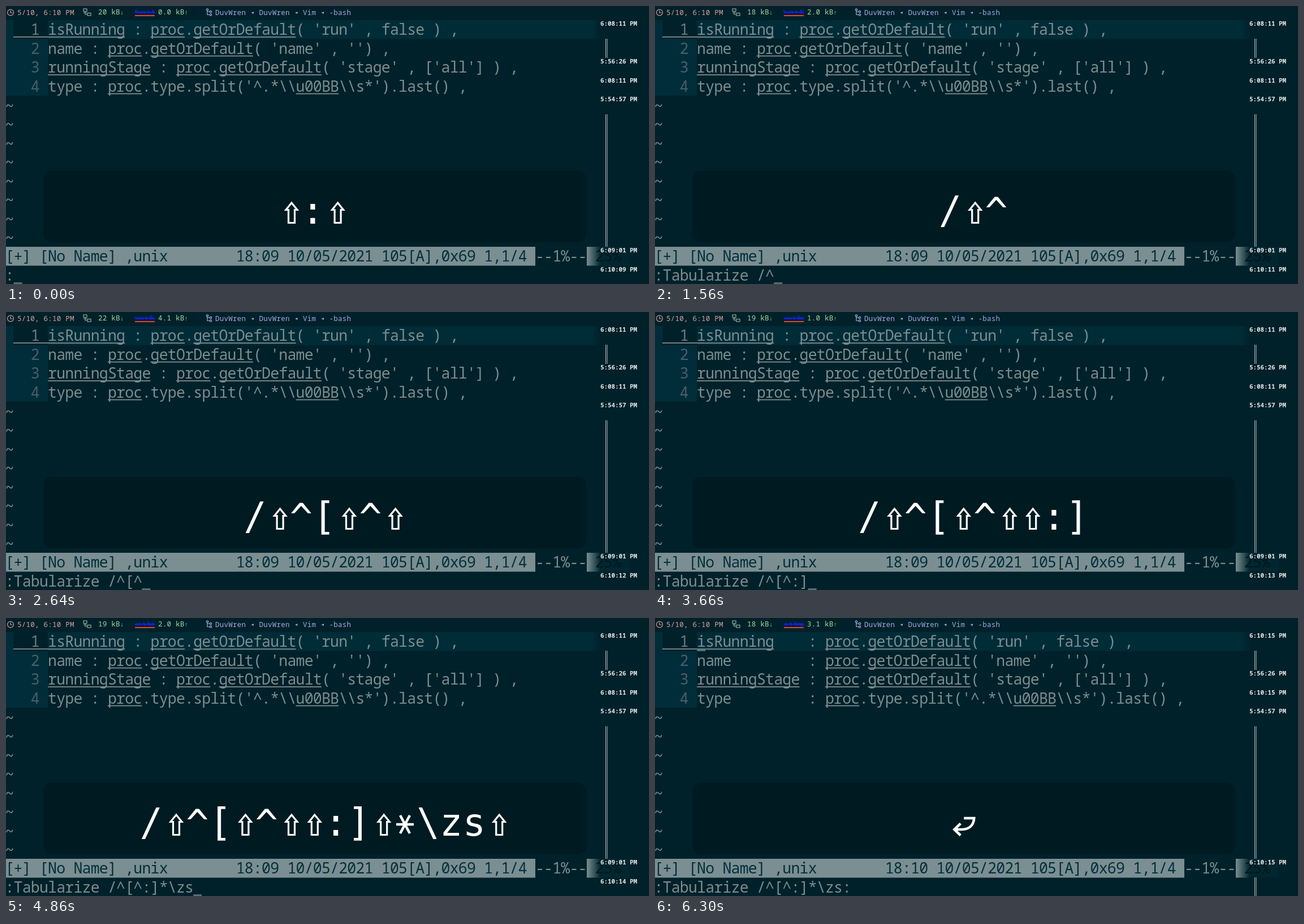
An HTML page that plays this animation: 1137x493 px, repeating every 6360 ms.

```html
<!DOCTYPE html>
<html lang="en">
<head>
<meta charset="utf-8">
<title>Aligning code on a colon</title>
<style>
  html, body { margin: 0; width: 100%; height: 100%; overflow: hidden; background: #00212a; }
  svg { display: block; width: 100vw; height: 100vh; }
  text { white-space: pre; font-family: "Noto Sans Mono", "DejaVu Sans Mono", monospace; }
  .code { font-size: 26.5px; font-weight: 300; letter-spacing: calc(15.12px - .6em); fill: #7b8d8f; }
  .code.num { fill: #48606a; }
  .code.num.on { fill: #687d82; }
  .code.dark { fill: #00303c; }
  .bar { font-size: 12.5px; letter-spacing: calc(7.75px - .6em); }
  .small { font-size: 10.5px; }
  .stamp { font-size: 11px; font-weight: 700; letter-spacing: calc(6.5px - .6em); fill: #e4e8e8; }
  .rule { fill: #7b8d8f; }
  .key { font: 67px "DejaVu Sans Mono", monospace; fill: #fff; text-anchor: middle; }
  .shape { fill: none; stroke: #fff; }
  .icon { fill: none; stroke-width: 1.2; }
</style>
</head>
<body>
<svg viewBox="0 0 1137 493" preserveAspectRatio="none">
  <defs>
    <linearGradient id="row">
      <stop offset=".985" stop-color="#002c38"/>
      <stop offset="1" stop-color="#00212a"/>
    </linearGradient>
    <linearGradient id="fade">
      <stop offset="0" stop-color="#7b8e91"/>
      <stop offset=".32" stop-color="#00272f"/>
      <stop offset="1" stop-color="#00262f"/>
    </linearGradient>
  </defs>
  <rect width="1137" height="493" fill="#00212a"/>

  <!-- menu bar -->
  <g class="icon" stroke="#dc9f9b"><circle cx="8" cy="11.5" r="5.4"/><path d="M8 8v4h3.4"/></g>
  <text class="bar" x="20" y="16" fill="#dc9f9b">5/10, 6:10 PM</text>
  <g class="icon" stroke="#93ab9b"><rect x="137" y="5" width="6" height="4.5"/><rect x="144" y="12.5" width="6" height="4.5"/><path d="M140 10v5h4M137 12h6"/></g>
  <text class="bar" id="down" x="163" y="15" fill="#a5d99f"></text>
  <path id="graph" fill="none" stroke="#1420f0" stroke-width="1.2"/>
  <rect x="228" y="16" width="35" height="2" fill="#e8442e"/>
  <text class="bar" id="up" x="269" y="15" fill="#a5d99f"></text>
  <g class="icon" stroke="#a5a8e2"><circle cx="356" cy="6.5" r="1.7"/><circle cx="362" cy="10" r="1.7"/><circle cx="362" cy="15.5" r="1.7"/><path d="M356 8v7.5h4M356 10h4"/></g>
  <text class="bar" x="370" y="16" fill="#a5a8e2">DuvWren ◂ DuvWren ◂ Vim ◂ -bash</text>

  <!-- editor -->
  <rect y="25" width="1052" height="33.5" fill="url(#row)"/>
  <rect y="25" width="74" height="134" fill="#002d39"/>
  <rect x="13.5" y="25" width="60.5" height="33.5" fill="#00212a"/>
  <g id="gutter"></g>
  <rect class="rule" x="13" y="54" width="61" height="1.8"/>
  <g id="before"></g>
  <g id="after"></g>

  <!-- key display -->
  <rect x="66" y="292" width="960" height="127" rx="15" fill="#001a21"/>
  <g id="keys"></g>

  <!-- status and command lines -->
  <rect y="427" width="936" height="33.5" fill="#7b8e91"/>
  <rect x="1027" y="427" width="75" height="33.5" fill="url(#fade)"/>
  <text class="code dark" id="status" x="-1.5" y="453"></text>
  <text class="code" x="936" y="453">--1%--</text>
  <text class="code" x="1041.8" y="453" style="fill:#00161d">25%</text>
  <text class="code" id="command" x="-1.5" y="487"></text>
  <rect class="rule" id="cursor" width="15" height="2"/>

  <!-- time line -->
  <path d="M1060.5 58V92M1063 58V92M1060.5 192V427M1063 192V427" stroke="#b4bebf"/>
  <path id="tail" d="M1060.5 460V493M1063 460V493" stroke="#b4bebf"/>
  <g id="stamps"></g>
</svg>
<script>
const LOOP = 6360, RUN = 5340, COL = 15.12, ROW = 33.5;
const $ = id => document.getElementById(id);
const colX = c => -1.5 + COL * c;
const rowY = r => 25 + ROW * r;

function add(parent, tag, attrs, text = '') {
  const el = document.createElementNS('http://www.w3.org/2000/svg', tag);
  for (const name in attrs) el.setAttribute(name, attrs[name]);
  el.textContent = text;
  parent.appendChild(el);
  return el;
}

const source = [
  ['isRunning', "proc.getOrDefault( 'run' , false ) ,"],
  ['name', "proc.getOrDefault( 'name' , '') ,"],
  ['runningStage', "proc.getOrDefault( 'stage' , ['all'] ) ,"],
  ['type', "proc.type.split('^.*\\\\u00BB\\\\s*').last() ,"]
];
const unknown = /isRunning|runningStage|proc|getOrDefault|u00BB/g;

function drawCode(group, pad) {
  source.forEach(([name, value], r) => {
    const line = `${name.padEnd(pad)} : ${value}`;
    add(group, 'text', { class: 'code', x: colX(5), y: rowY(r) + 26 }, line);
    for (const m of line.matchAll(unknown)) {
      add(group, 'rect', {
        class: 'rule', x: colX(5 + m.index), y: rowY(r) + 29.2,
        width: COL * m[0].length, height: 1.8
      });
    }
  });
}

drawCode($('before'), 0);
drawCode($('after'), 12);
for (let r = 0; r < 4; r++) {
  add($('gutter'), 'text', { class: 'code num' + (r ? '' : ' on'), x: colX(3), y: rowY(r) + 26 }, r + 1);
}
for (let r = 4; r < 12; r++) {
  add($('gutter'), 'text', { class: 'code', x: colX(0), y: rowY(r) + 27.5 }, '~');
}
const stamps = [0, 2, 3, 4, 12, 13].map(r =>
  add($('stamps'), 'text', { class: 'stamp', x: 1051, y: rowY(r) + 10 }));

// [time, key shown]; every key but shift and return is also typed
const strokes = [
  [120, 'T'], [240, 'a'], [360, 'b'], [480, 'u'], [600, 'l'], [720, 'a'],
  [840, 'r'], [900, 'i'], [960, 'z'], [1020, 'e'], [1140, ' '], [1260, '/'],
  [1380, '⇧'], [1500, '^'], [1860, '['], [2100, '⇧'], [2280, '^'], [2520, '⇧'],
  [2760, '⇧'], [2940, ':'], [3240, ']'], [3780, '⇧'], [4020, '*'], [4320, '\\'],
  [4500, 'z'], [4680, 's'], [4860, '⇧'], [5040, ':'], [RUN, '⏎']
];
const ticks = [360, 1300, 2240, 3240, 4200, 5160];
const traffic = [[20, '0.0'], [18, '2.0'], [22, '4.1'], [19, '1.0'], [19, '2.0'], [24, '1.0'], [18, '3.1']];

function typed(t) {
  let shown = '⇧:⇧', command = ':';
  for (const [at, key] of strokes) {
    if (at > t) break;
    shown = key === ' ' || key === '⏎' ? key : shown + key;
    if (!'⇧⏎'.includes(key)) command += key;
  }
  return { shown, command };
}

// keys drawn as strokes: offset, line width, path
const shapes = {
  '⇧': [3.5, 3.2, 'M0 349L10 361.5H5.5V384.500H-5.500V361.5H-10Z'],
  '⏎': [4, 4.5, 'M0 355H18C17 368 9 375 -4 375H-17M-6 364.5L-17 375L-6 385.5'],
  '*': [0, 4.5, 'M-15.5 366H15.5M-8.5 350L8.5 382M8.5 350L-8.5 382']
};

function drawKeys(shown) {
  const group = $('keys');
  group.textContent = '';
  [...shown].forEach((key, i) => {
    const x = 542.3 + (i - (shown.length - 1) / 2) * 40.8;
    if (shapes[key]) {
      const [dx, width, d] = shapes[key];
      add(group, 'path', { class: 'shape', 'stroke-width': width, transform: `translate(${x + dx} 0)`, d });
    } else {
      add(group, 'text', { class: 'key', x, y: key === '^' ? 387.5 : 386 }, key);
    }
  });
}

function drawTraffic(n) {
  const put = (id, value, arrow) => {
    $(id).textContent = value + ' kB';
    add($(id), 'tspan', { class: 'small' }, arrow);
  };
  put('down', traffic[n][0], '↓');
  put('up', traffic[n][1], '↑');
  let d = 'M228 11.5';
  for (let i = 0; i < 18; i++) {
    const noise = Math.abs(Math.sin((i + n) * 12.9898) * 43758.5453) % 1;
    const x = 228 + i * 2;
    d += `L${x} ${10.5 - noise ** 4 * 6}L${x + 1} ${11.5 + noise * 2}`;
  }
  $('graph').setAttribute('d', d);
}

const last = {};
function changed(name, value) {
  if (last[name] === value) return false;
  last[name] = value;
  return true;
}

function draw(t) {
  const { shown, command } = typed(t);
  const done = t >= RUN;
  if (changed('shown', shown)) drawKeys(shown);
  const n = Math.min(6, Math.floor(t / 1000));
  if (changed('traffic', n)) drawTraffic(n);

  $('command').textContent = command;
  $('cursor').setAttribute('x', colX(done ? 5 : command.length));
  $('cursor').setAttribute('y', done ? 56.5 : 490.5);
  $('before').style.display = done ? 'none' : '';
  $('after').style.display = done ? '' : 'none';
  $('tail').style.display = done ? '' : 'none';
  $('status').textContent =
    `[+] [No Name] ,unix        18:${done ? '10' : '09'} 10/05/2021 105[A],0x69 1,1/4`;

  const second = 9 + ticks.filter(at => at <= t).length;
  const edit = done ? '6:10:15' : '6:08:11';
  const times = [edit, '5:56:26', edit, '5:54:57',
    done ? '6:10:15' : '6:09:01',
    done ? '' : '6:10:' + String(second).padStart(2, '0')];
  stamps.forEach((el, i) => { el.textContent = times[i] && times[i] + ' PM'; });
}

const start = performance.now();
function tick() {
  draw((performance.now() - start) % LOOP);
  requestAnimationFrame(tick);
}
tick();
</script>
</body>
</html>
```
